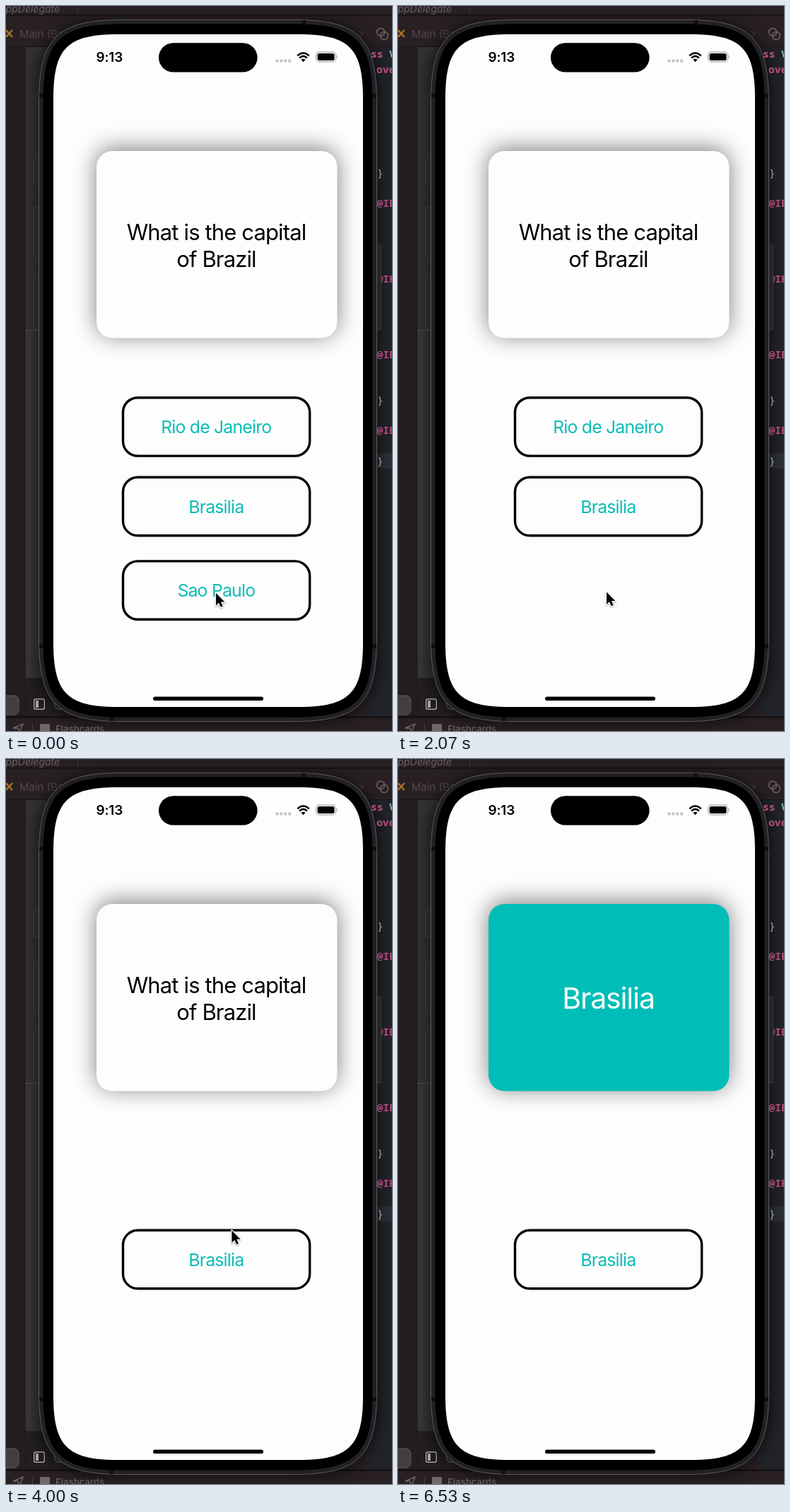
An HTML page for the animation above (6560 ms loop, 546 by 1025 pixels).

```html
<!DOCTYPE html>
<html lang="en">
<head>
<meta charset="utf-8">
<title>Flashcards</title>
<style>
html, body { margin: 0; width: 100%; height: 100%; overflow: hidden; background: #231d20; }
svg { display: block; width: 100%; height: 100%; }
text { font-family: Inter, Roboto, sans-serif; font-optical-sizing: none; white-space: pre; }
.mid { text-anchor: middle; letter-spacing: -.028em; }
.code { font: 700 14.5px "Noto Sans Mono", "DejaVu Sans Mono", monospace; fill: #b84d7b; }
.plain { fill: #a5a6aa; font-weight: 400; }
.answer { font-size: 24.8px; letter-spacing: -.032em; fill: #0bbdb6; }
.answer-box { fill: none; stroke: #000; stroke-width: 3.4; }
#cursor { paint-order: stroke; filter: drop-shadow(0 1px 1.2px rgba(0, 0, 0, .35)); }
</style>
</head>
<body>
<svg viewBox="0 0 546 1025" preserveAspectRatio="none">
  <defs>
    <filter id="soft" x="-30%" y="-30%" width="160%" height="160%"><feGaussianBlur stdDeviation="16"/></filter>
    <filter id="halo" x="-20%" y="-10%" width="140%" height="120%"><feGaussianBlur stdDeviation="10"/></filter>
  </defs>

  <!-- editor behind the phone -->
  <rect width="546" height="1025" fill="#292023"/>
  <rect y="58" width="27" height="947" fill="#241d20"/>
  <rect x="27" y="58" width="30" height="892" fill="#323234"/>
  <rect x="27" y="458" width="30" height="492" fill="#373738"/>
  <path d="M27 458.5H50" stroke="#555557"/>
  <path d="M27 58V1005" stroke="#1a1618"/>
  <rect x="27" y="950" width="60" height="55" fill="#231f21"/>
  <rect x="510" y="58" width="36" height="947" fill="#22242a"/>
  <rect x="510" y="632" width="36" height="22" fill="#2d3037"/>
  <path d="M0 13H546" stroke="#1b1517" stroke-width="3"/>
  <path d="M0 57.5H60M505 57.5H546" stroke="#1a1517"/>
  <path d="M101.5 0V10" stroke="#40363a"/>
  <text x="-10" y="9" font-size="14" font-style="italic" fill="#6a6164">AppDelegate</text>
  <path d="M0 34L9 44M0 44L9 34" stroke="#a8752b" stroke-width="2.4"/>
  <text x="19" y="44.5" font-size="15" fill="#52484b">Main (Base)</text>
  <path d="M499 35L505 39.5L499 44" fill="none" stroke="#453b3e" stroke-width="1.5"/>
  <g fill="none" stroke="#70666a" stroke-width="1.4"><circle cx="530" cy="37" r="5.5"/><circle cx="535" cy="42" r="5.5"/></g>
  <rect x="-12" y="975" width="30" height="27" rx="7" fill="#443c3f" stroke="#655c5f"/>
  <g fill="none" stroke="#aaa5a7" stroke-width="1.4">
    <rect x="39.7" y="979.7" width="14.6" height="14.6" rx="2.5"/>
    <circle cx="76" cy="987" r="7.5" stroke="#696366"/>
  </g>
  <rect x="42" y="982" width="4" height="10" fill="#aaa5a7"/>
  <path d="M0 1005.5H546" stroke="#0f0c0d" stroke-width="2"/>
  <path d="M10 1021L24 1015L19 1028L17 1021Z" fill="none" stroke="#70676a" stroke-width="1.4"/>
  <path d="M37.5 1015V1025" stroke="#4b4145"/>
  <rect x="48" y="1015" width="14" height="14" rx="2" fill="#71686b"/>
  <text x="70" y="1027" font-size="13" font-weight="600" fill="#695f63">Flashcards</text>

  <rect x="44" y="22" width="483" height="990" rx="80" opacity=".6" filter="url(#halo)"/>
  <g id="code"></g>

  <!-- phone -->
  <g fill="#252527" stroke="#363638">
    <rect x="39.5" y="211.5" width="9" height="40" rx="2"/>
    <rect x="39.5" y="284.5" width="9" height="75" rx="2"/>
    <rect x="39.5" y="380.5" width="9" height="76" rx="2"/>
    <rect x="522.5" y="336.5" width="8" height="121" rx="2"/>
  </g>
  <g id="phone"></g>

  <!-- status bar -->
  <text x="127.5" y="79" font-size="19" font-weight="600" letter-spacing="-.2">9:13</text>
  <rect x="216" y="52.2" width="139.6" height="41.4" rx="20.7"/>
  <g fill="#c3c3c4"><circle cx="383.5" cy="77.5" r="2.2"/><circle cx="389.4" cy="77.5" r="2.2"/><circle cx="395.3" cy="77.5" r="2.2"/><circle cx="401.2" cy="77.5" r="2.2"/></g>
  <g fill="none" stroke="#000" stroke-width="2.6">
    <path d="M412.3 70.4Q420.5 62.6 428.7 70.4"/>
    <path d="M415.2 73.5Q420.5 68.4 425.8 73.5"/>
  </g>
  <path d="M417.5 76Q420.5 73.4 423.5 76L420.5 79.2Z"/>
  <rect x="438.6" y="65.1" width="28" height="13.8" rx="4.5" fill="none" stroke="#a4a4a4" stroke-width="1.2"/>
  <rect x="440.6" y="67" width="24" height="10" rx="2.8"/>
  <path d="M467.9 69.7Q470 72 467.9 74.3Z" fill="#a4a4a4"/>

  <!-- card -->
  <rect x="128" y="201.6" width="340.5" height="264.5" rx="22.5" opacity=".5" filter="url(#soft)"/>
  <rect id="card" x="128" y="205" width="340.5" height="264.5" rx="22.5"/>
  <g id="front" class="mid" font-size="31">
    <text x="297.5" y="330.5">What is the capital</text>
    <text x="297.5" y="368.5">of Brazil</text>
  </g>
  <text id="back" class="mid" x="297.5" y="353" font-size="41" fill="#fdfdfd">Brasilia</text>

  <g id="answers"></g>
  <rect x="208" y="976.5" width="156" height="5.6" rx="2.8"/>
  <path id="cursor" d="M0 0V17.4L4 13.7L6.6 19.8L9.6 18.5L7 12.5H12.3Z" stroke="#fff" stroke-width="2.4" stroke-linejoin="round"/>
</svg>
<script>
const LOOP = 6560, FLIP = 4280, CURSOR_END = 5000, PRESS = 110;
const $ = id => document.getElementById(id);
const clamp = v => Math.max(0, Math.min(1, v));

function add(parent, tag, attrs, text = "") {
  const el = document.createElementNS("http://www.w3.org/2000/svg", tag);
  for (const key in attrs) el.setAttribute(key, attrs[key]);
  el.textContent = text;
  parent.append(el);
  return el;
}

// rectangle with continuous-curvature corners, as deep as a radius r
function smoothRect(x, y, w, h, r) {
  const e = 1.43 * r, c = 0.304 * r, X = x + w, Y = y + h;
  return `M${x + e} ${y}H${X - e}C${X - c} ${y} ${X} ${y + c} ${X} ${y + e}` +
    `V${Y - e}C${X} ${Y - c} ${X - c} ${Y} ${X - e} ${Y}` +
    `H${x + e}C${x + c} ${Y} ${x} ${Y - c} ${x} ${Y - e}` +
    `V${y + e}C${x} ${y + c} ${x + c} ${y} ${x + e} ${y}Z`;
}

const phone = $("phone");
add(phone, "path", { d: smoothRect(46.5, 19.5, 478, 992, 83), fill: "#212123", stroke: "#5c5c5e" });
add(phone, "path", { d: "M47 127H53M518 127H524M47 905H53M518 905H524M421 20V26M149 1005V1011", stroke: "#101011", "stroke-width": 6 });
add(phone, "path", { d: smoothRect(52.5, 25.5, 466, 980, 77) });
add(phone, "path", { d: smoothRect(67, 40, 438, 951, 64), fill: "#fdfdfd" });

const code = [[516, 73, "ss"], [524, 95, "override"], ...[284, 391, 498, 605].map(y => [524.5, y, "@IBAction"])];
for (const [x, y, s] of code) add($("code"), "text", { x, y, class: "code" }, s);
add($("code"), "text", { x: 542, y: 73, class: "code", style: "fill:#7fb8b0" }, "V");
for (const y of [241, 456, 562, 648]) add($("code"), "text", { x: 525, y, class: "code plain" }, y === 456 ? "," : "}");

// click: moment of release; wrong answers vanish then
const answers = [
  { name: "Rio de Janeiro", y: 552, click: 3000, hides: true },
  { name: "Brasilia", y: 664.6, click: FLIP },
  { name: "Sao Paulo", y: 783.2, click: 1000, hides: true }
];
for (const a of answers) {
  a.group = add($("answers"), "g", {});
  add(a.group, "rect", { x: 165.5, y: a.y + 1.7, width: 264.2, height: 82.4, rx: 20.8, class: "answer-box" });
  a.label = add(a.group, "text", { x: 297.3, y: a.y + 52, class: "mid answer" }, a.name);
}

// cursor stops: time, x, y
const path = [
  [0, 297, 830], [500, 295, 828.5], [2080, 295, 828.5], [2530, 330, 541.5],
  [2800, 324, 592], [3350, 323, 592], [3950, 319.5, 663.5], [4160, 318.5, 683]
];

function cursorAt(t) {
  let i = 0;
  while (i < path.length - 2 && t >= path[i + 1][0]) i++;
  const [t0, x0, y0] = path[i], [t1, x1, y1] = path[i + 1];
  const u = clamp((t - t0) / (t1 - t0)), e = u * u * (3 - 2 * u);
  return [x0 + (x1 - x0) * e, y0 + (y1 - y0) * e];
}

const show = (el, on) => el.setAttribute("visibility", on ? "visible" : "hidden");

function draw(t) {
  const flipped = t >= FLIP;
  $("card").setAttribute("fill", flipped ? "#00beb7" : "#fdfdfd");
  show($("front"), !flipped);
  show($("back"), flipped);
  for (const a of answers) {
    const since = t - a.click;
    show(a.group, !(a.hides && since >= 0));
    const alpha = since < -PRESS ? 1 : since < 0 ? 0.25 : 0.25 + 0.75 * clamp(since / 170);
    a.label.setAttribute("opacity", alpha);
  }
  show($("cursor"), t < CURSOR_END);
  $("cursor").setAttribute("transform", `translate(${cursorAt(t)})`);
}

const start = performance.now();
function tick() {
  draw((performance.now() - start) % LOOP);
  requestAnimationFrame(tick);
}
draw(0);
requestAnimationFrame(tick);
</script>
</body>
</html>
```
